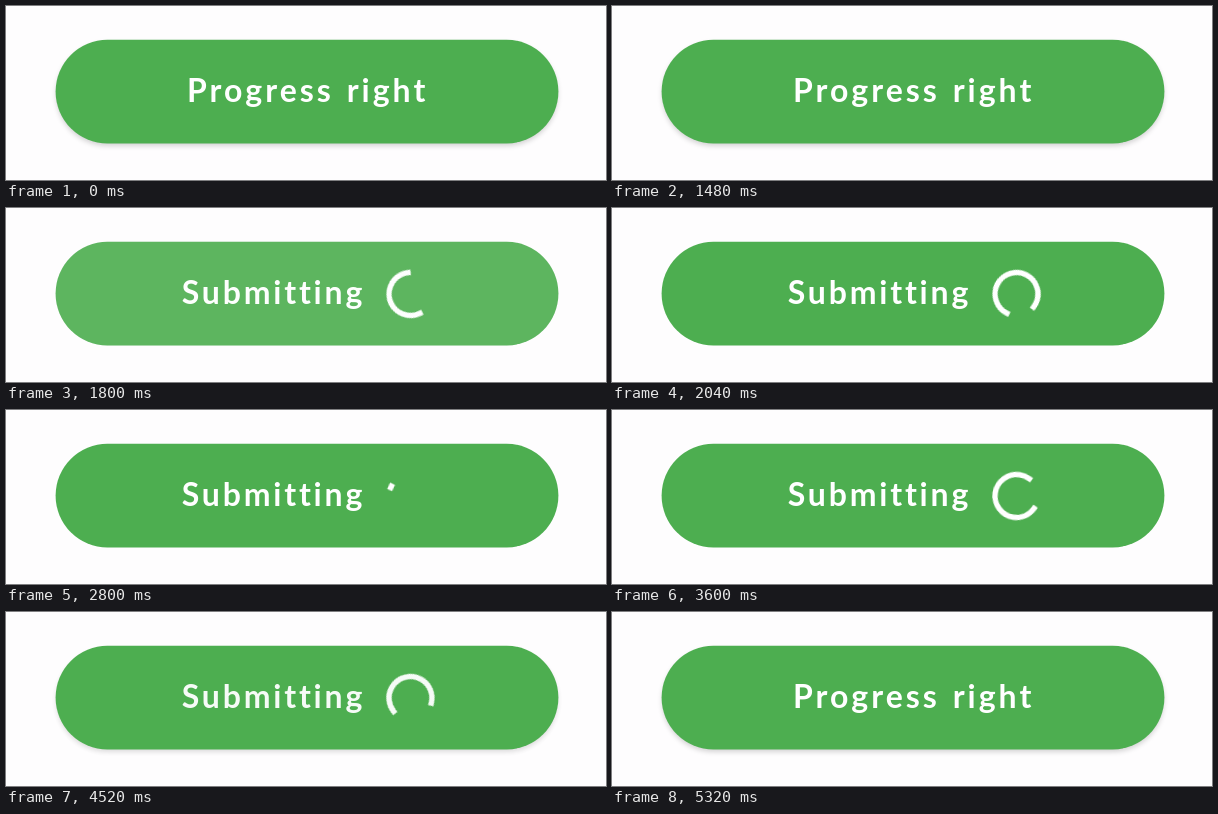
Write an HTML page that moves like this. It is 600 px wide and 174 px high and loops after 5400 ms.

```html
<!DOCTYPE html>
<html lang="en">
<head>
<meta charset="utf-8">
<title>Progress button</title>
<style>
  html, body { margin: 0; width: 100%; height: 100%; overflow: hidden; background: #fefdfe; }

  .stage { position: relative; width: 600px; height: 174px; overflow: hidden; }
  svg { position: absolute; left: 0; top: 0; }

  .shadow {
    position: absolute; left: 50px; top: 34px;
    width: 502px; height: 103px; border-radius: 51.5px;
    box-shadow: 0 3px 5px rgba(0, 0, 0, .17);
  }
  .face { fill: #4dae50; }
  .ripple { fill: #fff; transform-origin: 301px 85.5px; }

  text { font: 700 32px Lato, "Open Sans", sans-serif; fill: #fff; }
  .idle { letter-spacing: 3px; word-spacing: 2px; }
  .busy { letter-spacing: 2.8px; }

  .arc { fill: none; stroke: #fff; stroke-width: 5.4; stroke-linecap: square; }
  .spin { transform-origin: 404.5px 86px; }

  /* Every part shares the same 5.4 s loop */
  .shadow { animation: lift 5.4s linear infinite; }
  .ripple { animation: spread 5.4s cubic-bezier(.4, 0, .2, 1) infinite, glow 5.4s linear infinite; }
  .idle { animation: idle 5.4s cubic-bezier(.37, 0, .63, 1) infinite; }
  .busy { animation: busy 5.4s cubic-bezier(.37, 0, .63, 1) infinite; }
  .spin { animation: spin 5.4s linear infinite; }
  .arc { animation: arc 5.4s cubic-bezier(.4, 0, .2, 1) infinite; }

  @keyframes lift {
    0%, 27.926% { opacity: 1; }
    29.778%, 82.222% { opacity: 0; }
    84.074%, 100% { opacity: 1; }
  }
  @keyframes spread {
    0%, 27.444% { transform: translate(169px, 5px) scale(.59); }
    31.611%, 100% { transform: translate(0, 0) scale(1); }
  }
  @keyframes glow {
    0%, 27.444% { opacity: 0; }
    28.833%, 31.611% { opacity: .245; }
    34.389%, 100% { opacity: 0; }
  }
  @keyframes idle {
    0%, 27.926% { opacity: 1; }
    30.704%, 86.111% { opacity: 0; }
    88.889%, 100% { opacity: 1; }
  }
  @keyframes busy {
    0%, 30.704% { opacity: 0; }
    33.481%, 83.333% { opacity: 1; }
    86.111%, 100% { opacity: 0; }
  }
  @keyframes spin {
    0%, 27.926% { transform: rotate(0deg); }
    89.593%, 100% { transform: rotate(729deg); }
  }
  /* Head runs ahead, then the tail catches up; lengths in degrees */
  @keyframes arc {
    0%, 27.926% { stroke-dasharray: 3.6 356.4; stroke-dashoffset: 0; }
    40.259% { stroke-dasharray: 288 72; stroke-dashoffset: 0; }
    52.593% { stroke-dasharray: 3.6 356.4; stroke-dashoffset: -280.8; }
    64.926% { stroke-dasharray: 288 72; stroke-dashoffset: -280.8; }
    77.259% { stroke-dasharray: 3.6 356.4; stroke-dashoffset: -561.6; }
    89.593%, 100% { stroke-dasharray: 288 72; stroke-dashoffset: -561.6; }
  }
</style>
</head>
<body>
<div class="stage">
  <div class="shadow"></div>
  <svg width="600" height="174" viewBox="0 0 600 174">
    <clipPath id="pill"><rect x="49.6" y="33.7" width="502.8" height="103.7" rx="51.85"/></clipPath>
    <g clip-path="url(#pill)">
      <rect class="face" width="600" height="174"/>
      <circle class="ripple" cx="301" cy="85.5" r="256"/>
    </g>
    <text class="idle" x="181" y="95.5">Progress right</text>
    <g class="busy">
      <text x="175.8" y="95.5">Submitting</text>
      <g class="spin">
        <circle class="arc" cx="404.5" cy="86" r="21.5" pathLength="360"/>
      </g>
    </g>
  </svg>
</div>
</body>
</html>
```
